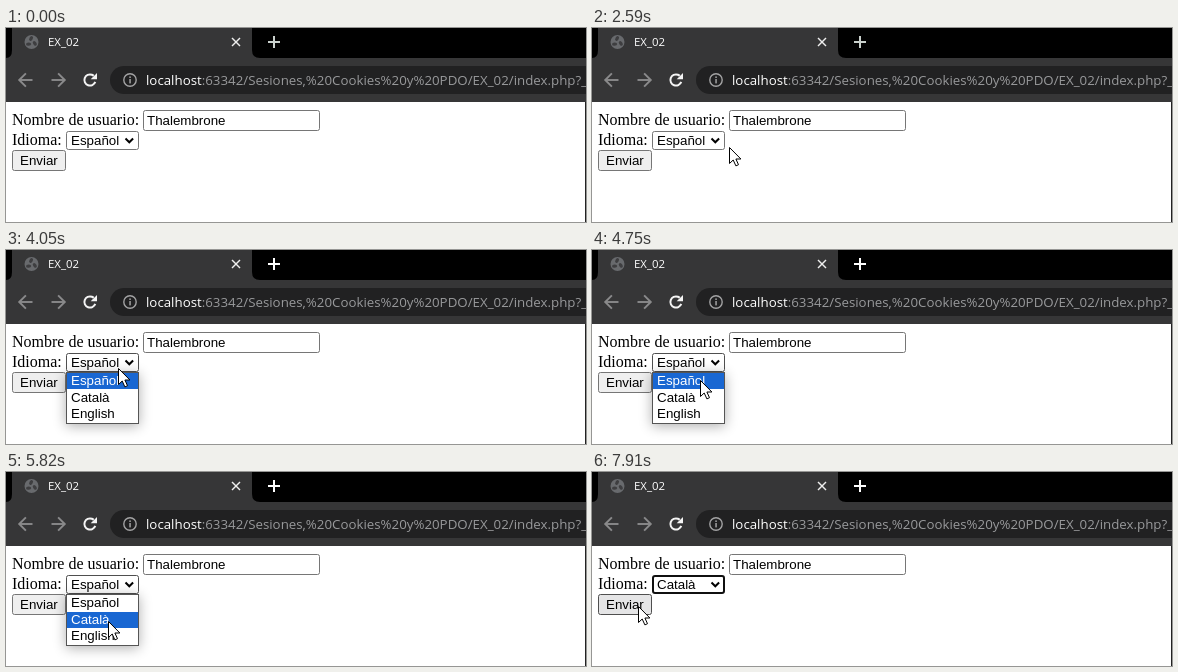
An HTML page with a canvas for the animation above (8 s loop, 580 by 194 pixels).

```html
<!DOCTYPE html>
<html lang="es">
<head>
<meta charset="utf-8">
<title>EX_02</title>
<style>
  html, body { margin: 0; width: 580px; height: 194px; overflow: hidden; background: #fff; }
  canvas { display: block; }
</style>
</head>
<body>
<canvas id="stage" width="580" height="194"></canvas>
<script>
const ctx = document.getElementById('stage').getContext('2d');
const LOOP = 8000;
const UI = '"Open Sans", "Noto Sans", sans-serif';
const ARIAL = '13.333px "Liberation Sans", Arial, sans-serif';
const SERIF = '16px "Liberation Serif", "Times New Roman", serif';
const BAR = '#363637', GREY = '#767676', DARK = '#4f4f4f';
const LANGS = ['Español', 'Català', 'English'];
const ROW = 16.5;

// Moments of the interaction, in ms
const ENTER = 160, ACTIVATE = 3480, OPEN = 3660, PICK = 6250;

// Where the pointer turns
const TURNS = [
  { t: ENTER, x: 60, y: 190 },
  { t: 960, x: 87, y: 138 },
  { t: 1790, x: 100, y: 126 },
  { t: 2590, x: 137, y: 119 },
  { t: 4050, x: 112, y: 118 },
  { t: 5820, x: 102, y: 149 },
  { t: 6360, x: 101, y: 147 },
  { t: 7910, x: 46, y: 134 }
];

function pointer(t) {
  const next = TURNS.findIndex(k => k.t > t);
  if (next < 0) return TURNS[TURNS.length - 1];
  const a = TURNS[next - 1], b = TURNS[next];
  const k = (t - a.t) / (b.t - a.t);
  return { x: Math.round(a.x + (b.x - a.x) * k), y: Math.round(a.y + (b.y - a.y) * k) };
}

const inside = (p, x, y, w, h) => p && p.x >= x && p.x < x + w && p.y >= y && p.y < y + h;

function text(str, x, y, font, color = '#000') {
  ctx.font = font;
  ctx.fillStyle = color;
  ctx.fillText(str, x, y);
  return x + ctx.measureText(str).width;
}

function rect(x, y, w, h, color) {
  ctx.fillStyle = color;
  ctx.fillRect(x, y, w, h);
}

function box(x, y, w, h, fill, stroke, line = 1) {
  ctx.beginPath();
  ctx.roundRect(x + line / 2, y + line / 2, w - line, h - line, 2);
  ctx.fillStyle = fill;
  ctx.fill();
  ctx.strokeStyle = stroke;
  ctx.lineWidth = line;
  ctx.stroke();
}

function line(color, width, ...pts) {
  ctx.strokeStyle = color;
  ctx.lineWidth = width;
  ctx.beginPath();
  for (const [x, y] of pts) ctx.lineTo(x, y);
  ctx.stroke();
}

function arc(x, y, r, color, width, from = 0, to = 7) {
  ctx.strokeStyle = color;
  ctx.lineWidth = width;
  ctx.beginPath();
  ctx.arc(x, y, r, from, to);
  ctx.stroke();
}

function tab() {
  ctx.fillStyle = BAR;
  ctx.beginPath();
  ctx.moveTo(6, 0);
  ctx.lineTo(246, 0);
  ctx.lineTo(246, 22);
  ctx.quadraticCurveTo(246, 30, 254, 30);
  ctx.lineTo(0, 30);
  ctx.quadraticCurveTo(6, 30, 6, 22);
  ctx.fill();
}

function globe(x, y) {
  ctx.fillStyle = '#686a6d';
  ctx.beginPath();
  ctx.arc(x, y, 7, 0, 7);
  ctx.fill();
  ctx.fillStyle = '#3e3e40';
  for (let i = 0; i < 3; i++) {
    const a = i * 2.1 + 0.4;
    ctx.beginPath();
    ctx.ellipse(x + 3.6 * Math.cos(a), y + 3.6 * Math.sin(a), 2.6, 1.7, a + 0.6, 0, 7);
    ctx.fill();
  }
}

// dir is -1 for back, 1 for forward
function navArrow(x, dir) {
  const y = 52, tip = x + 6.8 * dir;
  line('#8a8a8b', 1.9, [x - 6.5 * dir, y], [tip, y]);
  line('#8a8a8b', 1.9, [tip - 6.7 * dir, y - 6.7], [tip, y], [tip - 6.7 * dir, y + 6.7]);
}

function reload(x, y) {
  arc(x, y, 5.6, '#f4f4f4', 2, 0.35, 5.45);
  ctx.fillStyle = '#f4f4f4';
  ctx.beginPath();
  ctx.moveTo(x + 7, y - 7);
  ctx.lineTo(x + 7, y - 0.7);
  ctx.lineTo(x + 0.7, y - 0.7);
  ctx.fill();
}

function browser(active) {
  rect(0, 0, 580, 30, '#000');
  rect(0, 30, 580, 44, BAR);
  tab();
  globe(25.5, 14);
  text('EX_02', 42, 18, '11.4px ' + UI, '#fff');
  line('#eee', 1.5, [226, 10], [234, 18]);
  line('#eee', 1.5, [234, 10], [226, 18]);
  const plus = active ? '#fff' : '#c9d0cc';
  line(plus, 2, [262, 14], [274, 14]);
  line(plus, 2, [268, 8], [268, 20]);

  navArrow(20, -1);
  navArrow(52, 1);
  reload(84, 52);

  ctx.fillStyle = '#212122';
  ctx.beginPath();
  ctx.roundRect(104, 38, 520, 28, 14);
  ctx.fill();
  arc(124, 52, 6.2, '#a3a3a4', 1.4);
  rect(123.3, 51, 1.5, 4.4, '#a3a3a4');
  rect(123.3, 48.4, 1.5, 1.6, '#a3a3a4');
  const url = '13.3px ' + UI;
  const end = text('localhost', 140, 57, url, '#fff');
  text(':63342/Sesiones,%20Cookies%20y%20PDO/EX_02/index.php?_', end, 57, url, '#98999b');
}

function form(p, open, picked) {
  const overButton = !open && inside(p, 6, 122, 54, 21);
  const overSelect = open || inside(p, 60, 103, 73, 19);

  rect(0, 74, 580, 120, '#fff');
  rect(579, 74, 1, 120, '#222');

  text('Nombre de usuario:', 6, 97, SERIF);
  box(137, 82, 177, 21, '#fff', GREY);
  text('Thalembrone', 141, 97, ARIAL);

  text('Idioma:', 6, 117, SERIF);
  if (picked) box(60, 103, 73, 19, '#fff', '#101010', 2);
  else box(60, 103, 73, 19, '#fff', overSelect ? DARK : GREY);
  text(LANGS[picked ? 1 : 0], 65, 117, ARIAL);
  line('#000', 2, [119.5, 110.5], [123.3, 114.3], [127.1, 110.5]);

  box(6, 122, 54, 21, overButton ? '#e5e5e6' : '#efefef', overButton ? DARK : GREY);
  text('Enviar', 14, 137, ARIAL);
}

function menu(p) {
  ctx.save();
  ctx.shadowColor = 'rgba(0,0,0,.32)';
  ctx.shadowBlur = 12;
  ctx.shadowOffsetY = 2;
  rect(60, 122, 73, 52, '#fff');
  ctx.restore();
  const current = Math.floor((p.y - 122) / ROW) > 0 ? 1 : 0;
  LANGS.forEach((name, i) => {
    const top = Math.round(123 + i * ROW);
    if (i === current) rect(61, top, 71, 16, '#1967d2');
    text(name, 65, top + 12, ARIAL, i === current ? '#fff' : '#000');
  });
  ctx.strokeStyle = '#555';
  ctx.lineWidth = 1;
  ctx.strokeRect(60.5, 122.5, 72, 51);
}

const ARROW = new Path2D('M0 0V16L3.7 12.5 6.4 18.4 9 17.2 6.4 11.5H11.4Z');

function cursor({ x, y }) {
  ctx.save();
  ctx.translate(x + 0.5, y + 0.5);
  ctx.fillStyle = '#fff';
  ctx.fill(ARROW);
  ctx.strokeStyle = '#000';
  ctx.lineWidth = 1;
  ctx.stroke(ARROW);
  ctx.restore();
}

function draw(t) {
  const p = t >= ENTER ? pointer(t) : null;
  const picked = t >= PICK;
  const open = t >= OPEN && !picked;
  browser(t >= ACTIVATE);
  form(p, open, picked);
  if (open) menu(p);
  if (p) cursor(p);
}

const start = performance.now();
function tick() {
  draw((performance.now() - start) % LOOP);
  requestAnimationFrame(tick);
}
tick();
</script>
</body>
</html>
```
